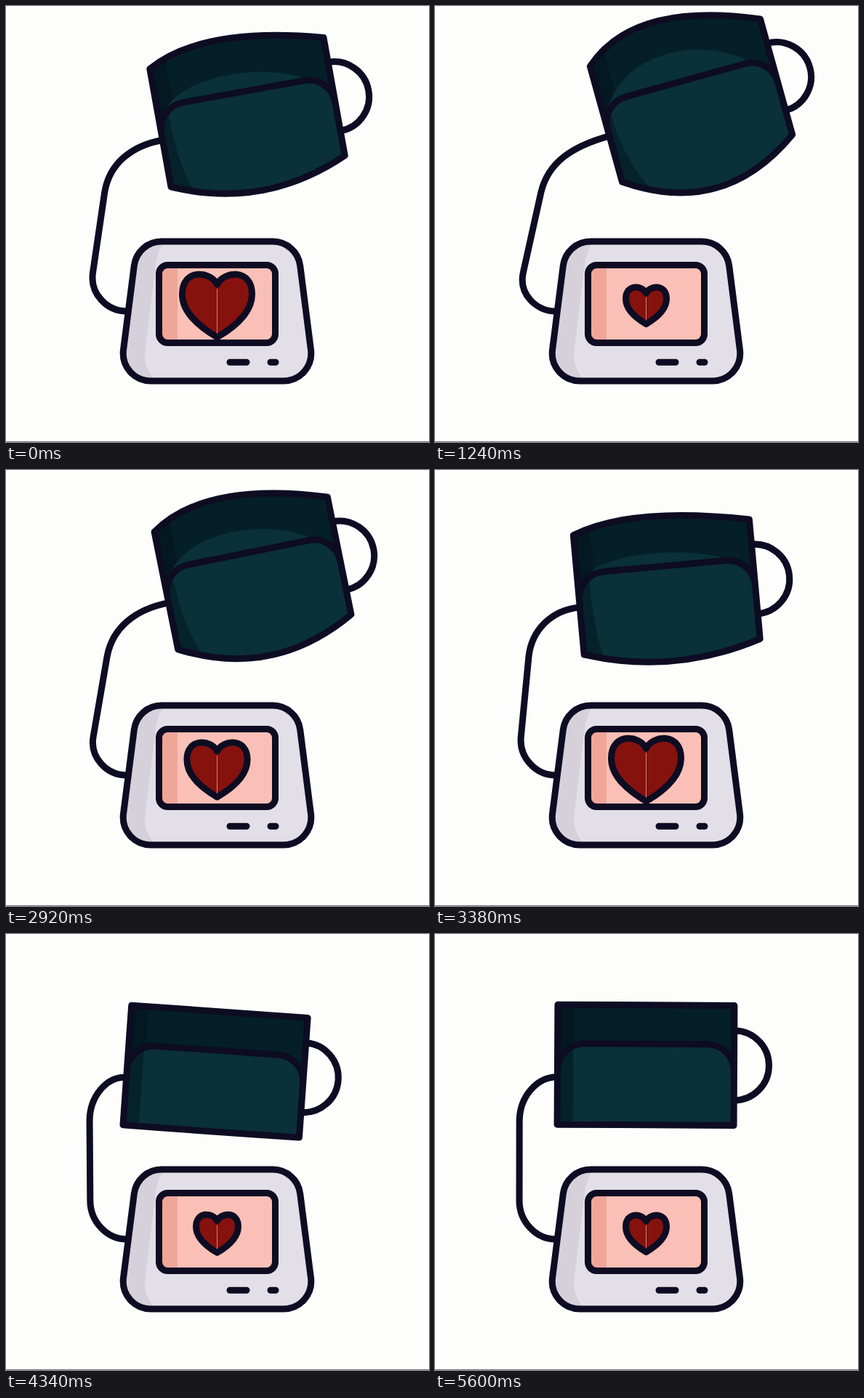
An HTML page that plays this animation: 582x600 px, repeating every 5.62 s.

```html
<!DOCTYPE html>
<html lang="en">
<head>
<meta charset="utf-8">
<title>Blood pressure monitor</title>
<style>
  html, body { margin: 0; width: 100%; height: 100%; overflow: hidden; background: #fdfdfc; }
  svg { display: block; width: 100vw; height: 100vh; }
  .ink { fill: none; stroke: #0d0c22; stroke-width: 9; stroke-linejoin: round; stroke-linecap: round; }
</style>
</head>
<body>
<svg viewBox="0 0 582 600">
  <defs>
    <clipPath id="cuffClip"><path id="cuffMask"/></clipPath>
    <clipPath id="panelClip"><path id="panelMask"/></clipPath>
    <clipPath id="bodyClip"><path id="bodyMask"/></clipPath>
    <clipPath id="screenClip"><rect x="210.5" y="356.5" width="160" height="107" rx="12"/></clipPath>
  </defs>
  <rect width="582" height="600" fill="#fdfdfc"/>
  <rect y="599" width="582" height="1" fill="#77777a"/>

  <path id="tube" class="ink"/>

  <g id="cuff">
    <path class="ink" d="M121.500,-48 A48,48 0 0 1 121.500,48"/>
    <g clip-path="url(#cuffClip)">
      <rect x="-140" y="-150" width="280" height="300" fill="#051f28"/>
      <rect x="-140" y="-150" width="42" height="300" fill="#041821"/>
      <path id="panel" fill="#05222b"/>
      <g clip-path="url(#panelClip)"><path id="panelLight" fill="#0a303a"/></g>
      <path class="ink" d="M-121.500,8 A37,37 0 0 1 -84.500,-29 H84.500 A37,37 0 0 1 121.500,8"/>
    </g>
    <path id="cuffEdge" class="ink"/>
  </g>

  <g clip-path="url(#bodyClip)">
    <rect x="150" y="315" width="280" height="210" fill="#e3dfe8"/>
    <path d="M224,320 Q208,332 206,356 L191,478 Q190,504 212,520 H150 V320Z" fill="#d5d0da"/>
  </g>
  <path id="bodyEdge" class="ink"/>
  <g clip-path="url(#screenClip)">
    <rect x="206" y="352" width="170" height="116" fill="#fac0b7"/>
    <rect x="206" y="352" width="30" height="116" fill="#f0a599"/>
  </g>
  <rect class="ink" x="210.5" y="356.5" width="160" height="107" rx="12"/>
  <path class="ink" d="M308,490.300 H331 M364,490.300 H371"/>

  <path id="heart" class="ink" style="fill:#86120e"/>
  <path id="heartLine" stroke="#d0807a" stroke-width="1"/>
</svg>
<script>
const LOOP = 5620;
const HALF_W = 121.5, HALF_H = 82.5;
const $ = id => document.getElementById(id);
const draw = (d, ...ids) => ids.forEach(id => $(id).setAttribute('d', d));

// step, angle, centre x, centre y, inflation
const POSES = [
  [0, -10.2, 332, 146.2, 24],
  [13, -14.3, 348, 134, 34.5],
  [26, -15.5, 352.5, 130, 38],
  [38, -15.8, 353.5, 129, 38.6],
  [50, -14.6, 349.2, 132.5, 36],
  [62, -11.4, 339.5, 142, 29.5],
  [83, 0.6, 299.5, 178.7, 6.5],
  [94, 4.2, 287.5, 189.5, 0],
  [106, 3, 288, 187, 0],
  [120, 0.3, 290, 180.3, 0]
];

function slope(k, c) {
  const a = POSES[Math.max(k - 1, 0)], b = POSES[Math.min(k + 1, POSES.length - 1)];
  return (b[c] - a[c]) / (b[0] - a[0]);
}

function poseAt(step) {
  let k = 0;
  while (k < POSES.length - 2 && POSES[k + 1][0] <= step) k++;
  const p = POSES[k], q = POSES[k + 1], span = q[0] - p[0];
  const u = (step - p[0]) / span, v = 1 - u;
  return [1, 2, 3, 4].map(c =>
    p[c] * v * v * (1 + 2 * u) + q[c] * u * u * (3 - 2 * u) +
    span * u * v * (slope(k, c) * v - slope(k + 1, c) * u));
}

// Steps come in groups of three lasting 20, 100 and 20 ms.
function stepAt(ms) {
  const rest = ms % 140;
  return 3 * Math.floor(ms / 140) + (rest < 20 ? 0 : rest < 120 ? 1 : 2);
}

function drawCuff([angle, cx, cy, inflation]) {
  const b = Math.max(0, inflation);
  $('cuff').setAttribute('transform', `translate(${cx} ${cy}) rotate(${angle})`);
  draw(`M${-HALF_W},${-HALF_H} C-60,${-HALF_H - 1.4 * b} 30,${-HALF_H - 1.05 * b}
    ${HALF_W},${-HALF_H} V${HALF_H} Q0,${HALF_H + 2.24 * b} ${-HALF_W},${HALF_H}Z`,
    'cuffMask', 'cuffEdge');
  draw(`M${-HALF_W},8 Q-117,-29 -85,${-29 - 0.55 * b}
    C-45,${-29 - 1.35 * b} 40,${-29 - 1.35 * b} 95,-27 Q117,-18 ${HALF_W},8
    V150 H${-HALF_W}Z`, 'panel', 'panelMask');
  const top = -100 - 0.3 * b, bottom = -100 + 0.35 * b;
  draw(`M${top},-120 V-10 Q${top},${45 + 0.2 * b} ${bottom},${HALF_H + 0.5 * b}
    V150 H140 V-120Z`, 'panelLight');
}

function drawTube([angle, cx, cy]) {
  const r = angle * Math.PI / 180, cos = Math.cos(r), sin = Math.sin(r);
  const ax = cx - HALF_W * cos - 17 * sin, ay = cy - HALF_W * sin + 17 * cos;
  const ex = 116 + 0.41 * (ax - 168), ey = 258;
  const lx = 116 + 0.18 * (ex - 116), ly = 367;
  const lean = (ex - lx) / (ly - ey);
  const out = 0.55 * (ax - ex), up = 0.55 * (ey - ay);
  draw(`M${ax},${ay} C${ax - out * cos},${ay - out * sin} ${ex + up * lean},${ey - up}
    ${ex},${ey} L${lx},${ly} C${lx - 29 * lean},${ly + 29} 139,420 166,420`, 'tube');
}

function drawHeart(step) {
  const d = Math.min(step, Math.abs(step - 72.5)) / 22;
  const w = 56 + 40 * Math.max(0, 1 - d * d) ** 1.5;
  const at = (x, y) => `${290.5 + x * w},${412 + y * w}`;
  draw(`M${at(0, -0.3)} C${at(-0.1, -0.5)} ${at(-0.5, -0.53)} ${at(-0.5, -0.16)}
    C${at(-0.5, 0.12)} ${at(-0.2, 0.34)} ${at(0, 0.457)}
    C${at(0.2, 0.34)} ${at(0.5, 0.12)} ${at(0.5, -0.16)}
    C${at(0.5, -0.53)} ${at(0.1, -0.5)} ${at(0, -0.3)}Z`, 'heart');
  draw(`M290.500,${412 - 0.3 * w + 6} V${412 + 0.457 * w - 5}`, 'heartLine');
}

draw(`M214,324 H367 A38,38 0 0 1 404.700,357.400 L419.500,473.400 A38,38 0 0 1 381.800,516
  H199.200 A38,38 0 0 1 161.500,473.400 L176.300,357.400 A38,38 0 0 1 214,324Z`,
  'bodyMask', 'bodyEdge');

function render(ms) {
  const step = stepAt(ms), pose = poseAt(step);
  drawCuff(pose);
  drawTube(pose);
  drawHeart(step);
}

const start = performance.now();
function tick() {
  render((performance.now() - start) % LOOP);
  requestAnimationFrame(tick);
}
tick();
</script>
</body>
</html>
```
